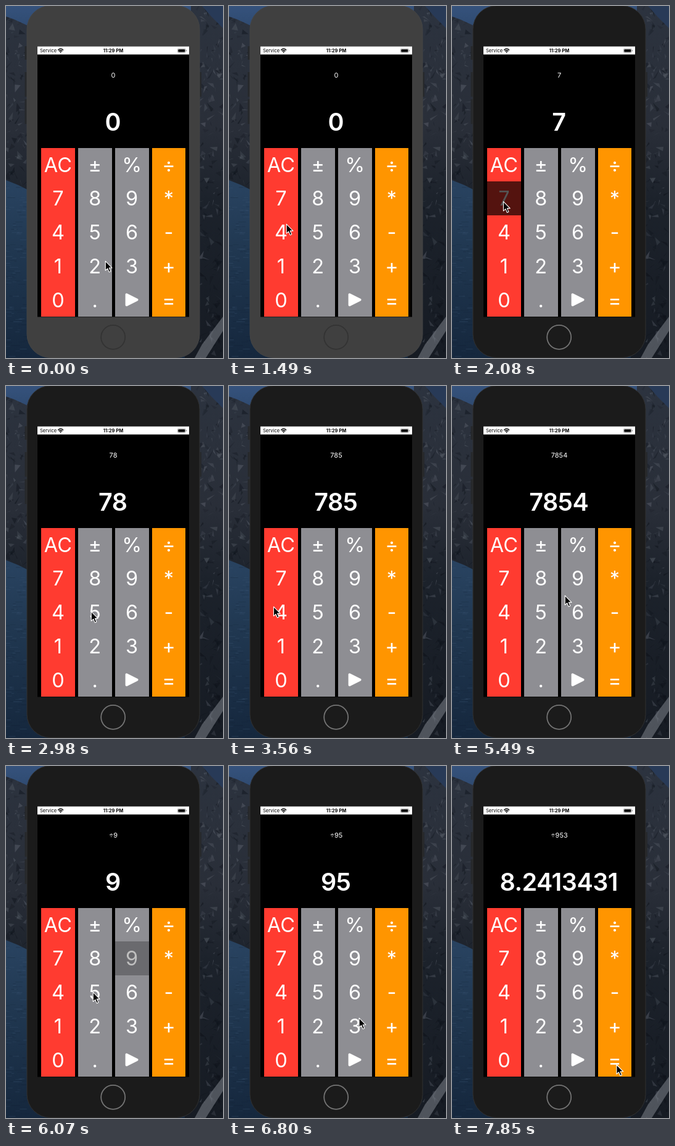
Animation, 352 px wide and 570 px high, one loop 8000 ms. Source, as an HTML page:

```html
<!DOCTYPE html>
<html lang="en">
<head>
<meta charset="utf-8">
<title>Calculator</title>
<style>
  html, body { margin: 0; width: 100%; height: 100%; overflow: hidden; background: #1a2029; }
  svg { display: block; width: 100vw; height: 100vh; }
  text { font-family: Inter, Roboto, sans-serif; fill: #fff; text-anchor: middle; }
  .key rect { shape-rendering: crispEdges; }
  .key text { font-size: 32.5px; }
  .entry { font-size: 11px; }
  .total { font-size: 39.5px; font-weight: 600; letter-spacing: -.5px; }
  .status text { font-size: 7.6px; fill: #000; }
</style>
</head>
<body>
<svg viewBox="0 0 352 570">
  <defs>
    <linearGradient id="sea" x2="0" y2="1">
      <stop stop-color="#35527c"/><stop offset=".1" stop-color="#2b4568"/>
      <stop offset=".52" stop-color="#28425f"/><stop offset=".7" stop-color="#203750"/>
      <stop offset="1" stop-color="#15273d"/>
    </linearGradient>
    <linearGradient id="rock" x2="0" y2="1">
      <stop stop-color="#2c333f"/><stop offset=".35" stop-color="#292e38"/>
      <stop offset=".55" stop-color="#1c222b"/><stop offset="1" stop-color="#161b23"/>
    </linearGradient>
    <clipPath id="land">
      <path d="M0 17L14 22L40 34V300L20 290L0 282ZM300 0H318L334 18L352 36V570H290Z"/>
    </clipPath>
  </defs>

  <path d="M0 0H352V570H0Z" fill="url(#sea)"/>
  <path d="M300 0H352V60Z" fill="#283a57"/>
  <g id="ripples"/>
  <g clip-path="url(#land)">
    <path d="M0 0H352V570H0Z" fill="url(#rock)"/>
    <g id="facets"/>
    <path d="M352 503L318 548L306 570H324L352 526Z" fill="#767b83" opacity=".6"/>
  </g>

  <path d="M30.5 65h5v22h-5zM30.5 107h5v40h-5zM30.5 151h5v40h-5zM312 107h5v40h-5z" fill="#26282b"/>
  <rect id="shell" x="34" y="-.5" width="280" height="570" rx="38"/>
  <circle id="home" cx="173.7" cy="536.3" r="19.5" fill="none" stroke-width="1.8"/>

  <path d="M51 65.6H297V503.6H51Z"/>
  <path d="M51 65.6H297V78.6H51Z" fill="#fff"/>
  <g class="status">
    <text x="55" y="75" style="text-anchor:start">Service</text>
    <text x="174" y="75" font-weight="700">11:29 PM</text>
    <path d="M84.2 71.4Q88.6 67.3 93 71.4M85.8 73.2Q88.6 70.7 91.4 73.2" fill="none" stroke="#000" stroke-width="1.4"/>
    <path d="M87 74.2Q88.6 73 90.2 74.2L88.6 75.8Z"/>
    <rect x="278.3" y="69.3" width="13" height="6" rx="1.5" fill="none" stroke="#888" stroke-width=".7"/>
    <rect x="279.3" y="70.2" width="11" height="4.2" rx=".7"/>
    <path d="M292.4 71.3v2" stroke="#888"/>
  </g>

  <text id="entry" class="entry" x="174" y="115.6"/>
  <text id="total" class="total" x="173.3" y="201.5"/>
  <g id="keys"/>
  <path id="cursor" d="M0 0V15.2L3.5 12L6 17.8L8.6 16.7L6.1 11H10.8Z" stroke="#fff" stroke-width="1.1" stroke-linejoin="round"/>
</svg>
<script>
const $ = id => document.getElementById(id);
const repeat = (count, make) => Array.from({ length: count }, (_, i) => make(i)).join('');
const DURATION = 8000, STEPS = 54, ACTIVATE = 13;

// Scenery
let seed = 11;
const random = (min, max) => min + (max - min) * (seed = seed * 16807 % 2147483647) / 2147483647;
$('ripples').innerHTML = repeat(110, () =>
  `<path d="M${random(-8, 30)} ${random(290, 570)}h${random(4, 14)}" stroke="${random(0, 1) < .5 ? '#0e1c2e' : '#4a6585'}"
    stroke-width=".8" opacity="${random(.15, .4)}"/>`);
$('facets').innerHTML = repeat(420, i => {
  const corner = () => `${random(-7, 7)} ${random(-8, 8)}`;
  return `<path transform="translate(${(i % 2 ? 312 : -2) + random(0, 40)} ${random(0, 570)})"
    d="M${corner()}L${corner()}L${corner()}Z" fill="${random(0, 1) < .55 ? '#0a0e15' : '#666c77'}"
    opacity="${random(.1, .42)}"/>`;
});

// Keypad, column by column
const columns = ['C7410', '±852.', '%963▶', '÷*-+='];
const colors = ['#ff3b30', '#8e8e93', '#8e8e93', '#ff9500'];
const WIDTH = 54.8, HEIGHT = 54.7, keys = {};
columns.forEach((column, c) => [...column].forEach((label, r) => {
  const x = 57 + c * 59.85 + WIDTH / 2, y = 229.6 + (r + .5) * HEIGHT;
  const face = label === '▶'
    ? `<path d="M-8.5 -8.5v17l17 -8.5z" fill="#fff" stroke="#fff" stroke-width="4" stroke-linejoin="round"/>`
    : `<text y="11.8">${label === 'C' ? 'AC' : label}</text>`;
  $('keys').insertAdjacentHTML('beforeend', `<g class="key" transform="translate(${x} ${y})">
    <rect x="${-WIDTH / 2}" y="${-HEIGHT / 2}" width="${WIDTH}" height="${HEIGHT}" fill="${colors[c]}"/>${face}</g>`);
  keys[label] = { x, y, node: $('keys').lastElementChild };
}));

// Step of each press, key, and where the pointer rests relative to the key's centre
const presses = [
  [0, '2', 17, -8], [14, '7', -1, 5], [18, '8', -6, 5], [21, '5', -6, -1], [26, '4', -12, -9],
  [34, '÷', -12, -4], [40, '9', -22, 26], [43, '5', -3, 0], [47, '3', 7, -13], [51, '=', 3, 8]
].map(([step, label, dx, dy]) => ({ step, label, x: keys[label].x + dx, y: keys[label].y + dy }));

// The pointer reaches each key two steps early, on a path that sags with distance
function cursorAt(step) {
  const next = presses.findIndex(p => p.step > step);
  const to = presses.at(next), from = presses.at(next < 0 ? -1 : next - 1);
  const arrive = to.step - 2, leave = Math.max(from.step, arrive - 4);
  const u = Math.min(1, Math.max(0, (step - leave) / (arrive - leave || 1)));
  const eased = 1 - (1 - u) ** 3;
  const dx = to.x - from.x, dy = to.y - from.y;
  const sag = 1.8 * Math.hypot(dx, dy) * eased * (1 - eased);
  return [from.x + dx * eased, from.y + dy * eased + sag];
}

function calculate(labels) {
  let entry = '', total = '0', stored = 0, operator = '';
  for (const label of labels) {
    if (label === '÷') {
      stored = total;
      operator = label;
      total = '';
    } else if (label === '=') {
      total = String(stored / total).slice(0, 9);
    } else {
      total = total === '0' ? label : total + label;
      entry = operator + total;
    }
  }
  return { entry: entry || '0', total: total || stored };
}

function draw(time) {
  const step = Math.min(STEPS - 1, Math.floor((time % DURATION + 16) * STEPS / DURATION));
  const active = step >= ACTIVATE;
  $('shell').setAttribute('fill', active ? '#1b1b1b' : '#404040');
  $('shell').setAttribute('stroke', active ? '#303030' : '#454545');
  $('home').setAttribute('stroke', active ? '#747474' : '#333');

  const done = presses.slice(1).filter(p => p.step <= step);
  const { entry, total } = calculate(done.map(p => p.label));
  $('entry').textContent = entry;
  $('total').textContent = total;

  const last = done.at(-1);
  for (const label in keys) {
    const glow = last?.label === label ? Math.min(1, .33 + .42 * (step - last.step)) : 1;
    keys[label].node.setAttribute('opacity', glow);
  }
  $('cursor').setAttribute('transform', `translate(${cursorAt(step)})`);
}

const start = performance.now();
(function tick() {
  draw(performance.now() - start);
  requestAnimationFrame(tick);
})();
</script>
</body>
</html>
```
